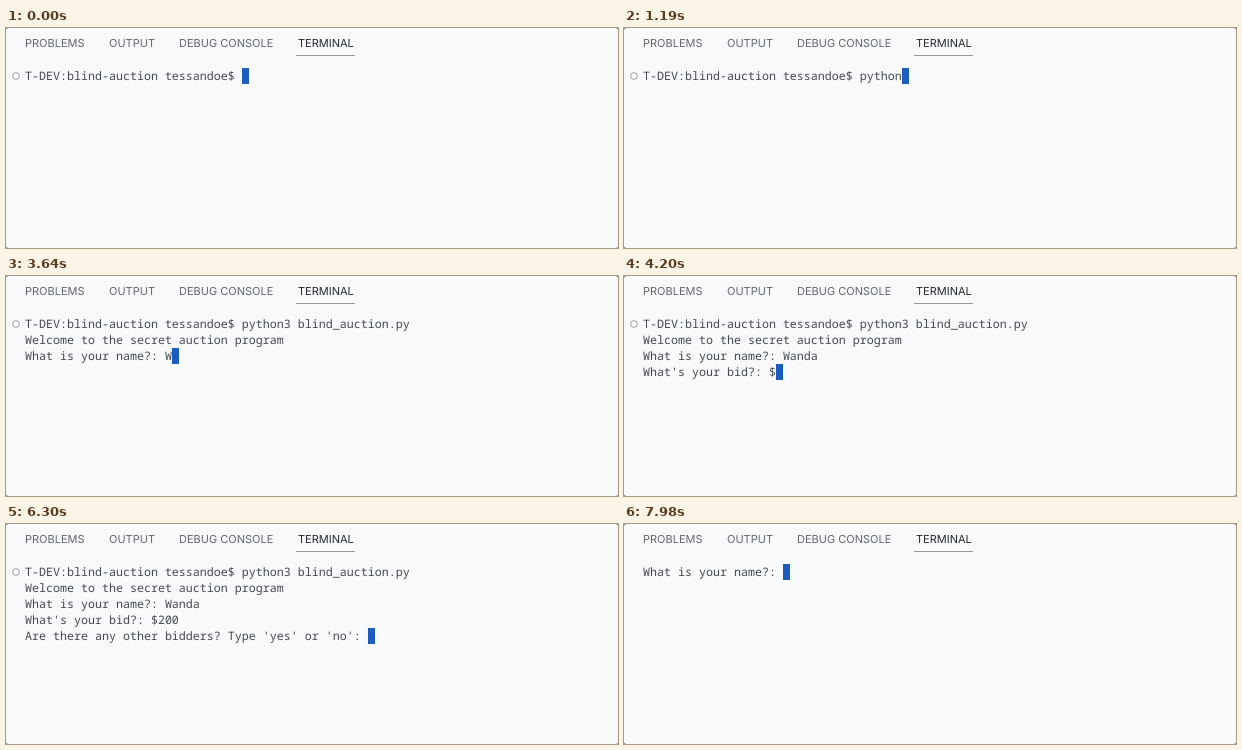
An HTML page for the animation above (8 s loop, 612 px wide and 220 px high).

```html
<!DOCTYPE html>
<html lang="en">
<head>
<meta charset="utf-8">
<title>Terminal session</title>
<style>
  html, body { margin: 0; width: 100%; height: 100%; overflow: hidden; background: #6b6d70; }
  svg { display: block; width: 612px; height: 220px; }
  text { white-space: pre; text-rendering: geometricPrecision; }
  .tabs { font: 11px Inter, Roboto, sans-serif; fill: #64676b; }
  .tabs .active { fill: #25282b; }
  .screen { font: 11.6667px "Noto Sans Mono", "DejaVu Sans Mono", monospace; fill: #46494d; }
</style>
</head>
<body>
<svg viewBox="0 0 612 220">
  <rect width="612" height="220" rx="2.5" fill="#f7f9fb"/>
  <g class="tabs">
    <text x="19" y="19">PROBLEMS</text>
    <text x="103" y="19">OUTPUT</text>
    <text x="173" y="19">DEBUG CONSOLE</text>
    <text x="292" y="19" class="active">TERMINAL</text>
  </g>
  <rect x="290" y="27" width="59" height="1" fill="#989b9f"/>
  <circle id="marker" cx="10" cy="48" r="3.2" fill="none" stroke="#a9acb0" stroke-width="1.1"/>
  <g class="screen">
    <text x="19" y="52"></text>
    <text x="19" y="68"></text>
    <text x="19" y="84"></text>
    <text x="19" y="100"></text>
    <text x="19" y="116"></text>
  </g>
  <rect id="cursor" width="7" height="16" fill="#1c5cbe"/>
</svg>
<script>
  const LOOP = 8000, LEFT = 19, TOP = 40, CELL = 7, ROW = 16;
  const ASK_NAME = 'What is your name?: ';
  const CLEAR = '\f';

  // Each entry adds its text to the screen at the given time in ms.
  const output = [
    [0, 'T-DEV:blind-auction tessandoe$ '],
    [420, 'p'], [560, 'y'], [700, 't'], [840, 'h'], [980, 'o'], [1190, 'n'],
    [1400, '3'], [1610, ' '], [1960, 'b'], [2170, 'lind_auction.py '],
    [2520, '\nWelcome to the secret auction program\n' + ASK_NAME],
    [3640, 'W'], [3780, 'a'], [3920, 'n'], [3990, 'd'], [4060, 'a'],
    [4200, "\nWhat's your bid?: $"],
    [5390, '2'], [5460, '0'], [5600, '0'],
    [6300, "\nAre there any other bidders? Type 'yes' or 'no': "],
    [7630, 'y'], [7700, 'e'], [7770, 's'],
    [7980, CLEAR + ASK_NAME]
  ];

  const rows = document.querySelectorAll('.screen text');
  const cursor = document.getElementById('cursor');
  const marker = document.getElementById('marker');
  let shown = null;

  function draw(now) {
    const time = now % LOOP;
    const written = output.filter(([at]) => at <= time).map(([, text]) => text).join('');
    if (written !== shown) {
      shown = written;
      const lines = written.split(CLEAR).pop().split('\n');
      rows.forEach((row, i) => { row.textContent = lines[i] || ''; });
      cursor.setAttribute('x', LEFT + lines.at(-1).length * CELL);
      cursor.setAttribute('y', TOP + (lines.length - 1) * ROW);
      marker.style.display = written.includes(CLEAR) ? 'none' : '';
    }
  }

  function tick() {
    draw(performance.now());
    requestAnimationFrame(tick);
  }
  tick();
</script>
</body>
</html>
```
